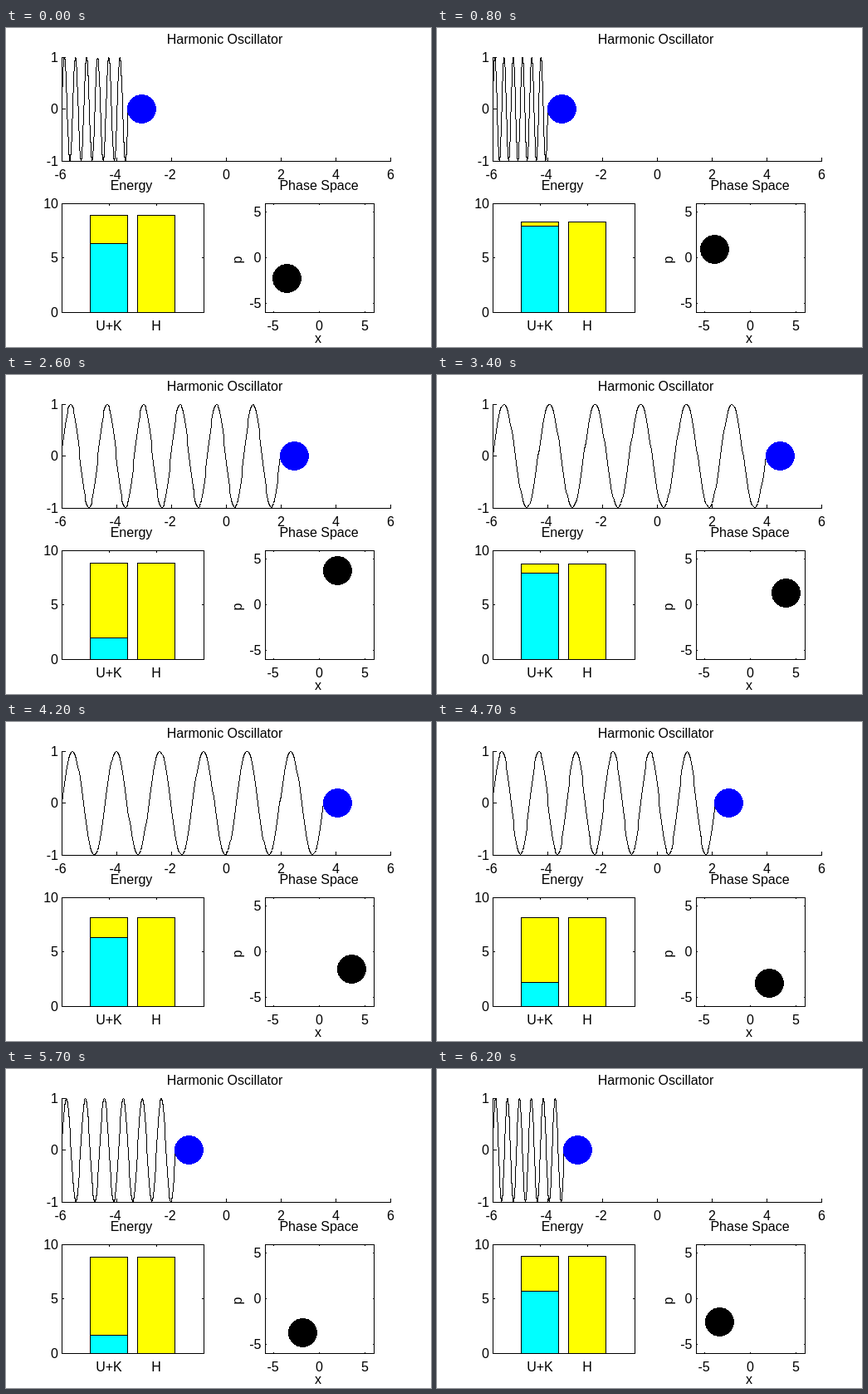
An HTML page for the animation above (6300 ms loop, 512 by 384 pixels).

```html
<!DOCTYPE html>
<html lang="en">
<head>
<meta charset="utf-8">
<title>Harmonic Oscillator</title>
<style>
  html, body { margin: 0; width: 100%; height: 100%; overflow: hidden; background: #fff; }
  svg { display: block; width: 512px; height: 384px; font: 16px "Liberation Sans", Arial, sans-serif; }
  path, rect, circle { shape-rendering: crispEdges; }
  path, .bar { stroke: #000; stroke-width: 1; }
  path { fill: none; }
  .mid { text-anchor: middle; }
  .end { text-anchor: end; }
</style>
</head>
<body>
<svg viewBox="0 0 512 384">
  <g id="labels"></g>
  <path id="axes"/>
  <path id="spring"/>
  <circle id="mass" cy="97.5" r="17.5" fill="#00f"/>
  <rect id="potential" class="bar" x="101.5" width="45" fill="#0ff"/>
  <rect id="kinetic" class="bar" x="101.5" width="45" fill="#ff0"/>
  <rect id="total" class="bar" x="158.5" width="45" fill="#ff0"/>
  <circle id="state" r="17.5"/>
</svg>
<script>
const $ = id => document.getElementById(id);
const set = (id, attrs) => {
  for (const key in attrs) $(id).setAttribute(key, attrs[key]);
};

// Plot scales give pixel indices; snap moves to the pixel centre
const snap = v => Math.floor(v) + 0.5;
const posX = v => 265 + 33 * v;
const posY = v => 97.5 - 62.5 * v;
const energyY = v => 342 - 13.1 * v;
const phaseX = v => 377.5 + 10.917 * v;
const phaseY = v => 276.5 - 10.917 * v;

function label(text, x, y, cls = "mid", turn = 0) {
  const el = document.createElementNS("http://www.w3.org/2000/svg", "text");
  el.textContent = text;
  el.setAttribute("class", cls);
  el.setAttribute("transform", `translate(${x} ${y}) rotate(${turn})`);
  $("labels").append(el);
}

function drawAxes() {
  let d = "M67.5 35V160.5H464M67.5 211.5H238.5V342.5H67.5ZM312.5 211.5H443.5V342.5H312.5Z";
  const tick = (x, y, dx, dy) => { d += `M${snap(x)} ${snap(y)}l${dx} ${dy}`; };

  for (let v = -6; v <= 6; v += 2) {
    tick(posX(v), 160, 0, -4.5);
    label(v, posX(v) + (v < 0 ? -1.5 : 0.5), 182);
  }
  for (const v of [-1, 0, 1]) {
    tick(67, posY(v), 4.5, 0);
    label(v, 63, Math.floor(posY(v)) + 6, "end");
  }

  for (const x of [124, 181]) {
    tick(x, 211, 0, 2.5);
    tick(x, 342, 0, -2.5);
  }
  for (const v of [0, 5, 10]) {
    const y = energyY(v);
    tick(67, y, 2.5, 0);
    tick(238, y, -2.5, 0);
    label(v, 63, Math.floor(y) + 6, "end");
  }

  for (const v of [-5, 0, 5]) {
    const x = phaseX(v), y = phaseY(v);
    tick(x, 211, 0, 1.5);
    tick(x, 342, 0, -1.5);
    tick(312, y, 1.5, 0);
    tick(443, y, -1.5, 0);
    label(v, snap(x) - (v < 0 ? 1 : 0), 364);
    label(v, 307.5, Math.floor(y) + 6, "end");
  }
  set("axes", { d });

  label("Harmonic Oscillator", 263.5, 19);
  label("Energy", 151, 195);
  label("Phase Space", 377, 195);
  label("U+K", 124, 364);
  label("H", 181, 364);
  label("x", 376, 379);
  label("p", 284, 279, "mid", -90);
}

function drawSpring(x) {
  const samples = 300;
  let d = "";
  for (let i = 0; i <= samples; i++) {
    const s = i / samples;
    const px = posX(-6 + (x + 6) * s), py = posY(Math.sin(12 * Math.PI * s));
    d += (i ? "L" : "M") + snap(px) + " " + snap(py);
  }
  set("spring", { d });
}

// Semi-implicit Euler in closed form: momentum lags half a step
const AMP = 4.132, PHASE = 2.613, STEP = 0.100042;
const STEPS = 63, STEP_MS = 100;

function draw(n) {
  const x = AMP * Math.cos(PHASE + STEP * n);
  const p = -AMP * Math.sin(PHASE + STEP * (n - 0.5));
  const u = x * x / 2, h = u + p * p / 2;
  const base = snap(energyY(0));
  const uY = snap(energyY(u) + 0.5), hY = snap(energyY(h) + 0.5);

  drawSpring(x);
  set("mass", { cx: snap(posX(x + 0.505)) });
  set("potential", { y: uY, height: Math.max(0, base - uY) });
  set("kinetic", { y: hY, height: uY - hY });
  set("total", { y: hY, height: base - hY });
  set("state", { cx: snap(phaseX(x)), cy: snap(phaseY(p)) });
}

let shown = -1;
function tick() {
  const n = Math.floor(performance.now() / STEP_MS) % STEPS;
  if (n !== shown) draw(shown = n);
  requestAnimationFrame(tick);
}

drawAxes();
tick();
</script>
</body>
</html>
```
